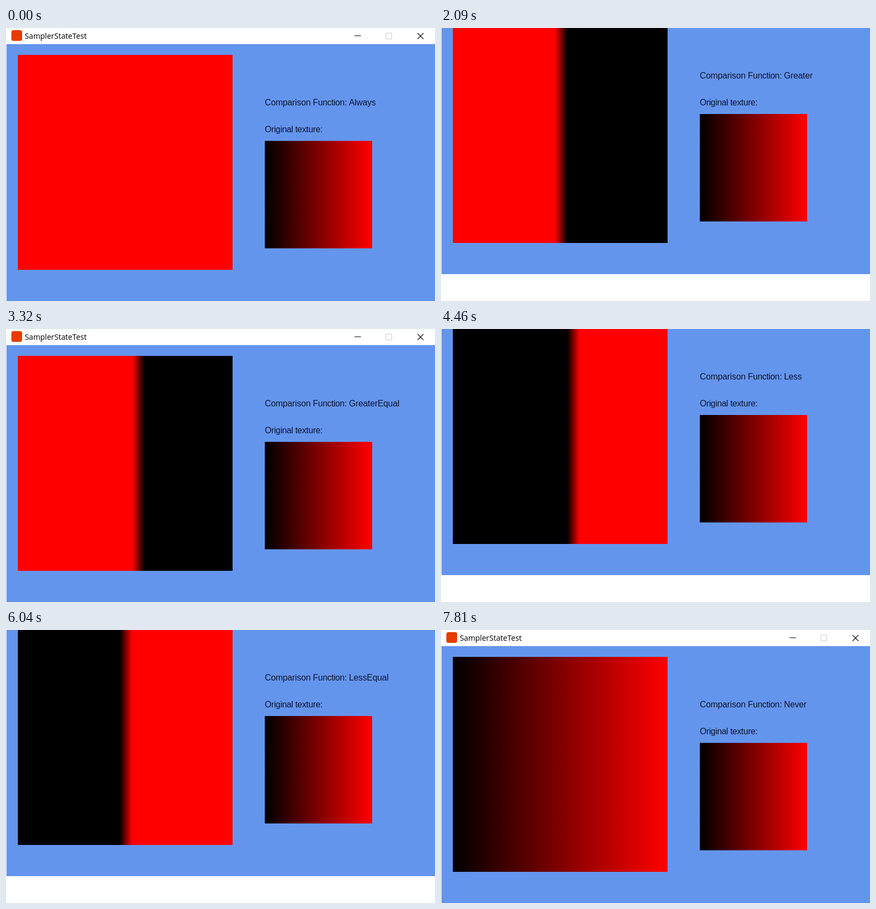
Animation, 799 px wide and 508 px high, one loop 8 s. Source, as an HTML page:

```html
<!DOCTYPE html>
<html lang="en">
<head>
<meta charset="utf-8">
<title>SamplerStateTest</title>
<style>
  html, body { margin: 0; width: 100%; height: 100%; overflow: hidden; background: #fff; }
  svg { display: block; }
  .title { font: 14.2px "Open Sans", sans-serif; }
  .label { font: 16px "Liberation Sans", Arial, sans-serif; letter-spacing: -.1px; fill: #0c1430; }
  .tight { letter-spacing: -.32px; }
</style>
</head>
<body>
<svg width="799" height="508" viewBox="0 0 799 508">
  <defs>
    <linearGradient id="result" gradientUnits="userSpaceOnUse" x1="212" x2="258">
      <stop offset="0"/><stop offset=".5"/><stop offset="1"/>
    </linearGradient>
    <linearGradient id="ramp">
      <stop offset="0" stop-color="#000"/><stop offset="1" stop-color="#f00"/>
    </linearGradient>
  </defs>
  <rect width="799" height="508" fill="#fff"/>
  <g id="app">
    <rect width="799" height="30" fill="#fff"/>
    <rect x="10" y="4" width="20" height="20" rx="4" fill="#e73c00"/>
    <text class="title" x="35" y="20">SamplerStateTest</text>
    <g fill="none" stroke="#000">
      <path d="M649 14.5h12"/>
      <path d="M707.5 9.5h11v11h-11z" stroke="#ccc"/>
      <path d="M766.5 9.5l11 11m0-11l-11 11" stroke-width="1.1"/>
    </g>
    <rect x="1" y="30" width="798" height="478" fill="cornflowerblue"/>
    <rect x="22" y="50" width="400" height="400" fill="url(#result)"/>
    <text class="label" x="482" y="144">Comparison <tspan class="tight">Function: </tspan><tspan id="mode"></tspan></text>
    <text class="label tight" x="482" y="194">Original texture:</text>
    <rect x="482" y="210" width="200" height="200" fill="url(#ramp)"/>
  </g>
</svg>
<script>
const LOOP = 8000, SHIFT = -50;
const BLACK = '#000', MID = '#800000', RED = '#f00';

// Colours left of, at and right of the compared value
const modes = {
  Always: [RED, RED, RED],
  Equal: [BLACK, RED, BLACK],
  Greater: [RED, BLACK, BLACK],
  GreaterEqual: [RED, RED, BLACK],
  Less: [BLACK, BLACK, RED],
  LessEqual: [BLACK, RED, RED],
  Never: [BLACK, MID, RED]
};

// Start time, mode, shifted up
const steps = [
  [0, 'Always', false],
  [500, 'Equal', true],
  [950, 'Equal', false],
  [2090, 'Greater', true],
  [2400, 'Greater', false],
  [2870, 'GreaterEqual', true],
  [3320, 'GreaterEqual', false],
  [4460, 'Less', true],
  [4900, 'Less', false],
  [6040, 'LessEqual', true],
  [6420, 'LessEqual', false],
  [7200, 'Never', true],
  [7280, 'Never', false],
  [7350, 'Never', true],
  [7810, 'Never', false]
];

const $ = id => document.getElementById(id);
const app = $('app'), mode = $('mode'), result = $('result');
let shown;

function show([, name, shifted]) {
  const full = name === 'Never';
  app.setAttribute('transform', `translate(0 ${shifted ? SHIFT : 0})`);
  mode.textContent = name;
  result.setAttribute('x1', full ? 22 : 212);
  result.setAttribute('x2', full ? 422 : 258);
  modes[name].forEach((color, i) => result.children[i].setAttribute('stop-color', color));
}

function tick() {
  const t = performance.now() % LOOP;
  const step = steps.findLast(s => s[0] <= t);
  if (step !== shown) show(shown = step);
  requestAnimationFrame(tick);
}
tick();
</script>
</body>
</html>
```
